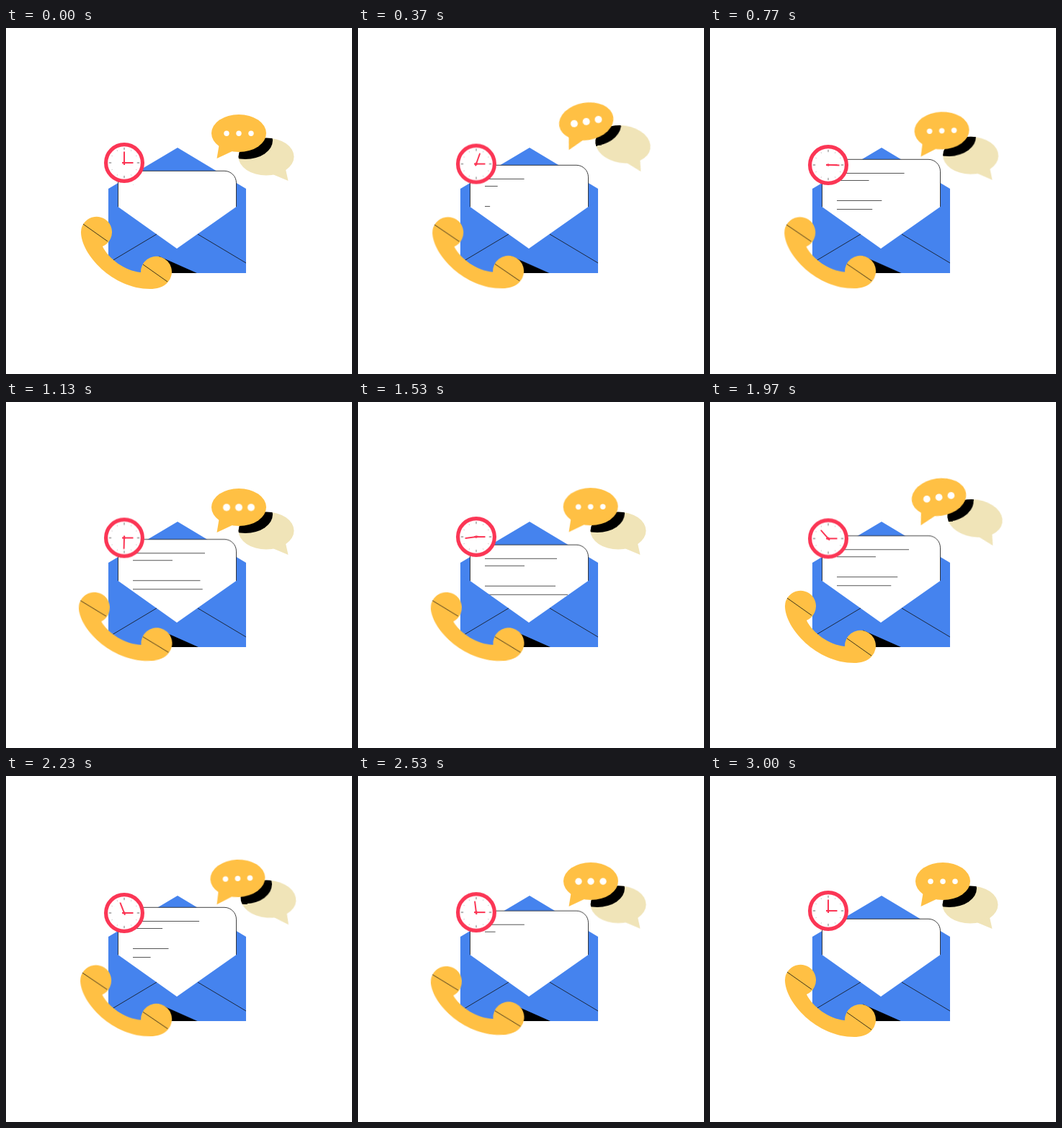
Animation, 480 px wide and 480 px high, one loop 3.03 s. Source, as an HTML page:

```html
<!DOCTYPE html>
<html lang="en">
<head>
<meta charset="utf-8">
<title>Contact</title>
<style>
  html, body { margin: 0; width: 100%; height: 100%; overflow: hidden; background: #fff; }
  svg { display: block; width: 100%; height: 100%; }

  :root {
    --blue: #4583ee; --yellow: #ffc044; --beige: #f0e4b8; --red: #fb3655;
    --sine: cubic-bezier(.37, 0, .63, 1);
    --snap: cubic-bezier(.333, 0, .333, 1);
    --out: cubic-bezier(.61, 1, .88, 1);
  }

  .letter, .clock, .phone, .phone-shadow, .front, .back, .minute, .dot, .row {
    animation: 3030ms var(--sine) infinite;
  }
  .thin { fill: none; stroke: #111; stroke-width: .8; }

  /* letter and clock drift up and down together, by different amounts */
  .letter { --shift: translateY(-16px); animation-name: drift; }
  .clock { --shift: translateY(3px); animation-name: drift; }
  @keyframes drift {
    0%, 48.8%, 99%, 100% { transform: none; }
    24.4%, 25.4%, 72%, 74.6% { transform: var(--shift); }
  }

  /* rows appear top to bottom with an ease-out, and leave bottom to top with an ease-in */
  .row { fill: #555; transform-origin: 176px 0; animation-timing-function: var(--out); }
  .row1 { animation-name: row1; }
  .row2 { animation-name: row2; }
  .row3 { animation-name: row3; }
  .row4 { animation-name: row4; }
  @keyframes row1 {
    0%, 93.4%, 100% { transform: scaleX(0); }
    33% { transform: scaleX(1); }
    66.96% { transform: scaleX(1); animation-timing-function: cubic-bezier(.12, 0, .39, 0); }
  }
  @keyframes row2 {
    0%, 5.38%, 88%, 100% { transform: scaleX(0); }
    38.4% { transform: scaleX(1); }
    61.6% { transform: scaleX(1); animation-timing-function: cubic-bezier(.12, 0, .39, 0); }
  }
  @keyframes row3 {
    0%, 10.76%, 82.6%, 100% { transform: scaleX(0); }
    43.8% { transform: scaleX(1); }
    56.2% { transform: scaleX(1); animation-timing-function: cubic-bezier(.12, 0, .39, 0); }
  }
  @keyframes row4 {
    0%, 16.14%, 77.2%, 100% { transform: scaleX(0); }
    49.1% { transform: scaleX(1); }
    50.8% { transform: scaleX(1); animation-timing-function: cubic-bezier(.12, 0, .39, 0); }
  }

  .minute { transform-origin: 164px 187px; animation-name: turn; animation-timing-function: var(--snap); }
  @keyframes turn {
    0% { transform: rotate(0deg); }
    99%, 100% { transform: rotate(360deg); }
  }

  .phone { --tilt: rotate(-5deg); transform-origin: 156px 329px; animation-name: ring; }
  .phone-shadow { --tilt: translateX(2.5px); animation-name: ring; }
  @keyframes ring {
    0%, 6.6%, 13.2%, 19.8%, 26.4%, 33%, 39.6%, 46.2%, 52.8%, 59.4%,
    65%, 66%, 72.6%, 79.2%, 85.8%, 92.4%, 99%, 100% { transform: none; }
    3.3%, 9.9%, 16.5%, 23.1%, 29.7%, 36.3%, 42.9%, 49.5%, 56.1%,
    62.7%, 69.3%, 75.9%, 82.5%, 89.1%, 95.7% { transform: var(--tilt); }
  }

  .front { transform-origin: 323px 146px; animation-name: front; animation-timing-function: var(--snap); }
  @keyframes front {
    0%, 38%, 49.67%, 85.8%, 100% { transform: translate(0, 0) rotate(0deg); }
    7.26%, 9.9%, 56.93%, 59.57% { transform: translate(-6.5px, -16.8px) rotate(-10deg); }
  }
  .back { transform-origin: 361px 178.5px; animation-name: back; animation-timing-function: var(--snap); }
  @keyframes back {
    0%, 2.2%, 30.7%, 52.8%, 87.1%, 100% { transform: translate(0, 0) rotate(0deg); }
    9.9%, 14.2%, 59.4%, 64.7% { transform: translate(6.5px, -17.2px) rotate(9deg); }
  }
  .dot { fill: #fff; transform-box: fill-box; transform-origin: center; animation-name: pulse; }
  @keyframes pulse {
    0%, 25%, 50%, 75%, 100% { transform: none; }
    12.5%, 37.5%, 62.5%, 87.5% { transform: scale(1.35); }
  }
</style>
</head>
<body>
<svg viewBox="0 0 480 480">
  <defs>
    <clipPath id="inBack"><ellipse class="back" cx="361" cy="178.5" rx="38.5" ry="26"/></clipPath>
    <clipPath id="inEnvelope"><rect x="142" y="223" width="191" height="117"/></clipPath>
  </defs>

  <!-- envelope -->
  <path fill="var(--blue)" d="M238 166L333 223V340H142V223Z"/>
  <g class="letter">
    <path fill="#fff" stroke="#111" stroke-width=".8" d="M155.5 198.3H303a16.5 16.5 0 0 1 16.5 16.5V330H155.5Z"/>
    <rect class="row row1" x="176" y="217" width="100" height="1"/>
    <rect class="row row2" x="176" y="227" width="55" height="1"/>
    <rect class="row row3" x="176" y="255" width="98" height="1"/>
    <rect class="row row4" x="176" y="267" width="115" height="1"/>
  </g>
  <path fill="var(--blue)" d="M142 238.5L237 306L333 238.5V340H142Z"/>
  <path class="thin" d="M142 326L209 286M266 286L333 326"/>

  <!-- phone -->
  <g clip-path="url(#inEnvelope)">
    <path class="phone-shadow" d="M212 316.5L266 340.5V350H212Z"/>
  </g>
  <g class="phone">
    <path fill="var(--yellow)" d="M104 283A21.5 21.5 0 1 1 134 303C142 320 165 337 187 339
      A21.5 21.5 0 1 1 225 352C219 360 208 362 200 362C148 362 104 314 104 283Z"/>
    <path class="thin" d="M107 272L141 296M190 328L224 352"/>
  </g>

  <!-- clock -->
  <g class="clock">
    <circle cx="164" cy="187" r="25.4" fill="#fff" stroke="var(--red)" stroke-width="5.2"/>
    <g fill="none" stroke="#777">
      <circle cx="164" cy="187" r="19.5" stroke-width="3.6" pathLength="400" stroke-dasharray="3 97" stroke-dashoffset="1.5"/>
      <circle cx="164" cy="187" r="19.5" stroke-width="1.2" pathLength="1200" stroke-dasharray="8 92" stroke-dashoffset="4" opacity=".6"/>
    </g>
    <g stroke="var(--red)" stroke-width="2">
      <path d="M161 187H176.5"/>
      <path class="minute" d="M164 190V171.5"/>
    </g>
    <circle cx="164" cy="187" r="1.8" fill="var(--red)"/>
  </g>

  <!-- speech bubbles -->
  <g class="back" fill="var(--beige)">
    <ellipse cx="361" cy="178.5" rx="38.5" ry="26"/>
    <path d="M370 203L391.5 212L387.5 194Z"/>
  </g>
  <g clip-path="url(#inBack)">
    <g class="front"><ellipse cx="332" cy="156" rx="38" ry="26"/></g>
  </g>
  <g class="front">
    <ellipse cx="323" cy="146" rx="38" ry="26" fill="var(--yellow)"/>
    <path fill="var(--yellow)" d="M296 160L292.5 181L316 170Z"/>
    <circle class="dot" cx="306" cy="146.3" r="3.7"/>
    <circle class="dot" cx="323" cy="146.3" r="3.7"/>
    <circle class="dot" cx="340" cy="146.3" r="3.7"/>
  </g>
</svg>
</body>
</html>
```
